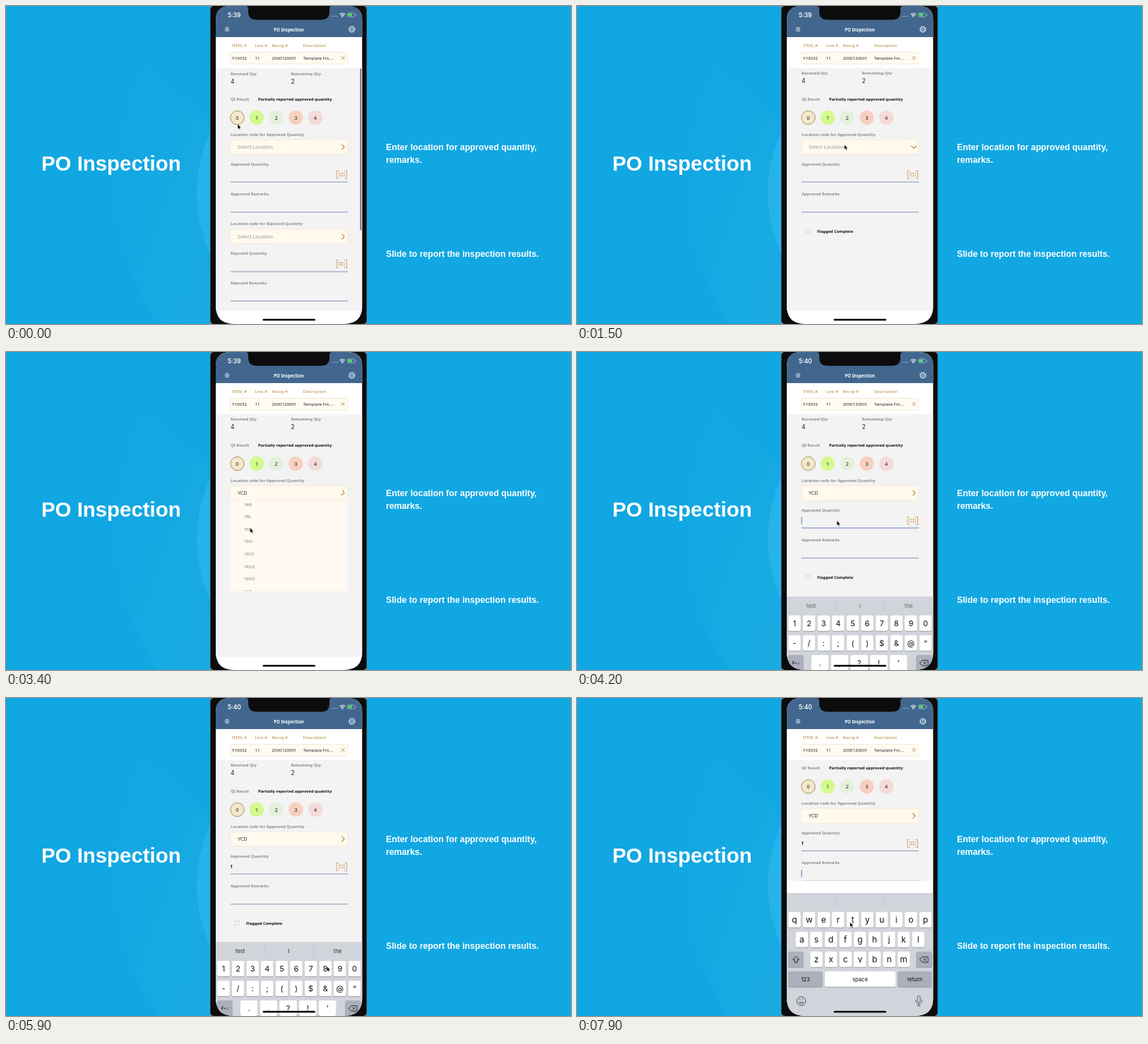
Recreate the animation shown at these times as an HTML page. Size 800 by 450 pixels, loop 8 s.

```html
<!DOCTYPE html>
<html lang="en">
<head>
<meta charset="utf-8">
<title>PO Inspection</title>
<style>
  html, body { margin: 0; width: 100%; height: 100%; overflow: hidden; background: #10a7e2; }
  svg { display: block; width: 100vw; height: 100vh; }
  text { font-family: "Noto Sans", "Open Sans", sans-serif; white-space: pre; }
  .big { font-family: "Liberation Sans", Arial, sans-serif; font-weight: 700; }
  .ui { font-family: Inter, Roboto, sans-serif; }
</style>
</head>
<body>
<svg id="stage" viewBox="0 0 800 450"></svg>
<script>
const LOOP = 8000;
const GOLD = '#b58a3c', CREAM = '#fff9ee', LABEL = '#8b8b8b', INK = '#222';

// ---- markup helpers ----
const text = (x, cy, s, size, fill, extra = '') =>
  `<text x="${x}" y="${(cy + size * 0.36).toFixed(2)}" font-size="${size}" fill="${fill}" ${extra}>${s}</text>`;
const rect = (x, y, w, h, fill, extra = '') =>
  `<rect x="${x}" y="${y}" width="${w}" height="${h}" fill="${fill}" ${extra}/>`;
const stroke = (d, color, width = 1, extra = '') =>
  `<path d="${d}" fill="none" stroke="${color}" stroke-width="${width}" ${extra}/>`;
const group = (id, body, extra = '') => `<g id="${id}" ${extra}>${body}</g>`;
const MID = 'text-anchor="middle"', SEMI = 'font-weight="600"', BOLD = 'font-weight="700"';

const label = (x, cy, s) => text(x, cy, s, 5.7, LABEL, SEMI);
const underline = (y, id = '') => `<path ${id && `id="${id}"`} d="M318 ${y}H484" stroke="#8294b9" stroke-width="1"/>`;
const chevron = (cy, id = '') =>
  `<path ${id && `id="${id}"`} d="M475.4 ${cy - 3.8}L479 ${cy}L475.4 ${cy + 3.8}" fill="none" stroke="${GOLD}" stroke-width="1.1"/>`;
const selectBox = y => rect(317.5, y, 166, 20.5, CREAM, 'rx="1.5" stroke="#f5ead6" stroke-width=".8"');
const scanIcon = cy =>
  stroke(`M471 ${cy - 5.5}H468V${cy + 5.5}H471M479.500 ${cy - 5.5}H482.500V${cy + 5.5}H479.500`, '#d2a06a', 1) +
  stroke(`M471.500 ${cy - 3}V${cy + 3.500}M474 ${cy - 3}V${cy + 3.500}M476.500 ${cy - 3}V${cy + 3.500}M479 ${cy - 3}V${cy + 3.500}`, '#cf9a66', 1, 'stroke-dasharray="2.4 1"');

// ---- page content ----
const chips = [['#f4e8cb', 327.5], ['#d2fa8c', 355], ['#e4f0dc', 382.7], ['#f8d0bf', 410.3], ['#f4dad8', 438]]
  .map(([fill, x], i) =>
    `<circle cx="${x}" cy="158" r="${i ? 10.2 : 9.7}" fill="${fill}" ${i ? '' : 'stroke="#a8905f" stroke-width="1"'}/>` +
    text(x, 158, i, 7.6, INK, MID)).join('');

const form =
  group('summary',
    label(318, 94.7, 'Received Qty') + label(403.500, 94.7, 'Remaining Qty') +
    text(318, 106, '4', 8.6, INK, 'class="ui"') + text(403.500, 106, '2', 8.6, INK, 'class="ui"')) +
  label(318, 132, 'QI Result') +
  text(357, 132, 'Partially reported approved quantity', 5.7, '#111', SEMI) + chips +
  label(318, 181.500, 'Location code for Approved Quantity') + selectBox(189.300) + chevron(199.500, 'chev') +
  group('location', '') +
  label(318, 223.500, 'Approved Quantity') + underline(249, 'qtyLine') + scanIcon(238.700) +
  group('qty', text(317.6, 238.800, '1', 6.2, '#111', SEMI)) +
  label(318, 266, 'Approved Remarks') + underline(291.700, 'remLine') +
  group('flagged',
    rect(324.500, 315.800, 5.4, 5.4, '#f6f6f6', 'stroke="#ccc" stroke-width=".7"') +
    text(340, 318.800, 'Flagged Complete', 5.7, '#111', SEMI)) +
  group('rejected',
    label(318, 308, 'Location code for Rejected Quantity') + selectBox(316) + chevron(326.200) +
    text(328, 326.200, 'Select Location', 7.1, '#999') +
    label(318, 350, 'Rejected Quantity') + scanIcon(365) + underline(376) +
    label(318, 392, 'Rejected Remarks') + underline(417.500)) +
  rect(317.6, 233.500, 1, 10, '#3f74c4', 'id="caret"');

const codes = 'YAA YAB YBL YCD YDO YDO1 YDO2 YDO3 YGR YIN001 YIN002 YPP YPF001 YPM0101 YPM0102 YPR010 YPR020'.split(' ');
const list = `<g id="list" clip-path="url(#listClip)">` + rect(317.500, 210, 166.500, 199.500, '#fff9f1') +
  group('items', codes.map((c, i) => text(337.500, 218 + i * 17.6, c, 5.6, '#777')).join('')) +
  '</g>';

// ---- keyboard ----
const GREY_KEY = '#abb0bb';
const key = (cx, cy, w, s, size, fill = '#fff') =>
  rect(cx - w / 2, cy - 10.4, w, 22, '#888c94', 'rx="2.6"') +
  rect(cx - w / 2, cy - 11.2, w, 22, fill, 'rx="2.6"') +
  text(cx, cy, s, size, '#111', MID + ' class="ui"');
const row = (chars, x0, cy, size, step = 20.6, w = 17.6) =>
  [...chars].map((c, i) => key(x0 + i * step, cy, w, c === '&' ? '&amp;' : c, size)).join('');

const numbers = row('1234567890', 308, 314, 11) + row('-/:;()$&@“', 308, 342, 11) +
  row('.,?!’', 344, 370, 11, 27.8, 25) + key(310, 370, 22, '#+=', 5.6, GREY_KEY) + key(323.5, 398, 49, 'ABC', 7.8, GREY_KEY);
const letters = row('qwertyuiop', 308, 314, 12) + row('asdfghjkl', 318.3, 342, 12) + row('zxcvbnm', 339, 370, 12) +
  key(310, 370, 22, '', 8, GREY_KEY) +
  stroke('M310 365.500L305.500 370.200H308V374.300H312V370.200H314.500Z', '#222', .9) +
  key(323.500, 398, 49, '123', 7.8, GREY_KEY) +
  `<circle cx="317.500" cy="429" r="6.3" fill="none" stroke="#50555c" stroke-width="1"/>` +
  stroke('M314 430.500Q317.500 435.500 321 430.500Z', '#50555c', .9) +
  stroke('M315.500 425.800V427.800M319.500 425.800V427.800', '#50555c', 1.1);

const keyboard = rect(297, 276, 207.500, 400, '#d1d4da') +
  stroke('M366 281V297M435.500 281V297', '#bfc3ca', .7) +
  group('hints', [[331.500, 'test'], [400.500, 'I'], [469.500, 'the']]
    .map(([x, s]) => text(x, 289, s, 7.8, '#333', MID + ' class="ui"')).join('')) +
  group('numbers', numbers) + group('letters', letters) +
  key(491.300, 370, 22.500, '', 8, GREY_KEY) +
  stroke('M489 366.300H497V374H489L485.300 370.150ZM490.500 368.300L494.300 372M494.300 368.300L490.500 372', '#222', .9) +
  key(401, 398, 100, 'space', 7.6) + key(478.200, 398, 48, 'return', 7.6, GREY_KEY) +
  rect(482, 421.500, 4, 9, 'none', 'rx="2" stroke="#50555c" stroke-width=".9"') +
  stroke('M479.500 427Q479.500 432.800 484 432.800Q488.500 432.800 488.500 427M484 432.800V435.800M481.500 435.800H486.500', '#50555c', .9);

// ---- phone chrome ----
const gear = `<circle cx="489.700" cy="33" r="4" fill="none" stroke="#e6edf5" stroke-width="1.2" stroke-dasharray="2 1.140"/>` +
  `<circle cx="489.700" cy="33" r="3.500" fill="none" stroke="#e6edf5" stroke-width=".8"/><circle cx="489.700" cy="33" r="1.500" fill="none" stroke="#e6edf5" stroke-width=".8"/>`;
const header = rect(297, 0, 207.500, 44, '#42678f') +
  group('clock', '') + text(400.500, 33.500, 'PO Inspection', 6.1, '#fff', MID + ' ' + SEMI) +
  stroke('M310.500 30.800H315.500M309.700 33H316.300M310.500 35.200H315.500', '#fff', .9) + gear +
  stroke('M461 14.500H470', '#a9bccf', 1, 'stroke-dasharray="1.300 1.100"') +
  stroke('M472.500 11.800Q476.300 8.700 480.100 11.800M474 13.500Q476.300 11.700 478.600 13.500', '#fff', 1.2) +
  `<circle cx="476.300" cy="15.200" r=".9" fill="#fff"/>` +
  rect(483.500, 9.800, 10.500, 5.600, 'none', 'rx="1.500" stroke="#a9bccf" stroke-width=".7"') +
  rect(484.300, 10.600, 5.800, 4, '#55d964', 'rx=".8"') + rect(494.800, 11.600, .8, 2, '#a9bccf');

const table =
  [[320, 'ITEM_#'], [352.500, 'Line #'], [376.500, 'Recvg #'], [420.700, 'Description']]
    .map(([x, s]) => text(x, 55.500, s, 6.1, GOLD)).join('') +
  rect(317.500, 65.500, 166, 16.500, '#fffbf3', 'stroke="#f4e5c8" stroke-width=".8" rx="1"') +
  [[320, 'Y10032'], [352.500, '11'], [376.500, '2000120001'], [420.700, 'Template Fin....']]
    .map(([x, s]) => text(x, 74, s, 6.1, INK)).join('') +
  stroke('M474.500 71L479.500 76M479.500 71L474.500 76', GOLD, .9);

const screenPath = 'M297 20Q297 0 318 0H483Q504.500 0 504.500 20V424Q504.500 450 478 450H323Q297 450 297 424Z';

document.getElementById('stage').innerHTML = `
<defs>
  <clipPath id="screenClip"><path d="${screenPath}"/></clipPath>
  <clipPath id="viewClip"><rect id="view" x="297" y="87.500" width="207.500" height="344"/></clipPath>
  <clipPath id="listClip"><rect id="listBox" x="317" y="210" width="168" height="199.500"/></clipPath>
  <linearGradient id="fan" x1="0" y1="0" x2="1" y2="1">
    <stop offset="0" stop-color="#fff" stop-opacity="0"/><stop offset="1" stop-color="#fff" stop-opacity=".045"/>
  </linearGradient>
</defs>
${rect(0, 0, 800, 450, '#10a7e2')}
<path d="M195 80Q150 160 155 265Q160 370 215 450H289V165Z" fill="url(#fan)"/>
<path d="M289 178Q251 264 289 351Z" fill="#26b3ec"/>
${rect(289, 0, 222, 450, '#8c8378')}
${rect(289, 0, 222, 450, '#3b3b3d', 'rx="5"')}
${rect(290, 0, 220, 450, '#0c0c0d', 'rx="5"')}
<g clip-path="url(#screenClip)">
  ${rect(297, 0, 207.5, 450, '#fff')}
  ${header}${table}
  <g clip-path="url(#viewClip)">
    ${rect(297, 87.5, 207.5, 400, '#f3f3f3')}
    ${group('form', form)}
    ${list}
  </g>
  ${rect(501.3, 88.5, 1.9, 229, '#747474', 'rx="1" id="bar"')}
  ${group('keyboard', keyboard)}
  ${rect(363.500, 442.700, 74.500, 2.600, '#000', 'rx="1.300"')}
</g>
<path d="M339 0Q343 0 343 4V8Q343 19.500 355 19.500H446Q458 19.500 458 8V4Q458 0 462 0Z" fill="#0c0c0d"/>
${text(50, 222.7, 'PO Inspection', 29.4, '#fff', 'class="big"')}
${text(538, 199.700, 'Enter location for approved quantity,', 12.25, '#fff', 'class="big"')}
${text(538, 218, 'remarks.', 12.25, '#fff', 'class="big"')}
${text(538, 350.300, 'Slide to report the inspection results.', 12.25, '#fff', 'class="big"')}
<path id="pointer" d="M0 0V7.200L1.700 5.700L2.800 8.200L4 7.700L2.900 5.300H5.100Z" fill="#000" stroke="#fff" stroke-width=".5"/>`;

// ---- motion ----
const $ = id => document.getElementById(id);
const set = (id, name, value) => $(id).setAttribute(name, value);
const show = (id, on) => set(id, 'opacity', +on);
const clamp = v => Math.min(1, Math.max(0, v));
const ramp = (t, from, to) => clamp((t - from) / (to - from));
const smooth = p => p * p * (3 - 2 * p);
const easeOut = p => 1 - (1 - p) ** 3;

const pointerPath = [
  [400, 328, 167], [1200, 378.500, 196], [1850, 378.500, 196], [2050, 364, 325], [3000, 364, 325],
  [3200, 345, 249], [3350, 345, 249], [3900, 368, 238.500], [4300, 368, 238.500], [4800, 309, 315],
  [4900, 309, 315], [5100, 345, 329], [5450, 476, 397], [5700, 476, 397], [6500, 337.700, 287],
  [7100, 337.700, 287], [7750, 386.500, 317]];

function along(path, t) {
  const i = path.findIndex(p => p[0] > t);
  if (i < 0) return path[path.length - 1].slice(1);
  if (!i) return path[0].slice(1);
  const a = path[i - 1], b = path[i], k = smooth(ramp(t, a[0], b[0]));
  return [a[1] + (b[1] - a[1]) * k, a[2] + (b[2] - a[2]) * k];
}

function render(t) {
  const early = t < 500, chosen = t >= 3300;
  const [px, py] = along(pointerPath, t);
  set('pointer', 'transform', `translate(${px} ${py})`);

  $('clock').innerHTML = text(314, 12.800, t < 4000 ? '5:39' : '5:40', 8.300, '#fff', SEMI + ' class="ui"');
  set('summary', 'transform', `translate(0 ${early ? .9 : 0})`);
  show('rejected', early);
  show('flagged', !early);
  set('bar', 'opacity', 1 - ramp(t, 400, 700));

  // Location drop-down
  const turn = smooth(ramp(t, 1250, 1400)) - smooth(ramp(t, 3300, 3450));
  set('chev', 'transform', `rotate(${90 * turn} 477 199.500)`);
  $('location').innerHTML = text(328, 199.500, chosen ? 'YCD' : 'Select Location', 7.1, chosen ? '#333' : '#999');
  const open = smooth(ramp(t, 1550, 1800)) - smooth(ramp(t, 3300, 3550));
  set('listBox', 'height', 199.500 * open);
  const scroll = 73.400 * smooth(ramp(t, 2200, 2600)) - 53.400 * smooth(ramp(t, 2650, 3000));
  set('items', 'transform', `translate(0 ${-scroll})`);

  // Keyboard and the shortened page above it
  const up = easeOut(ramp(t, 4070, 4570)) - smooth(ramp(t, 5750, 6100)) + easeOut(ramp(t, 6857, 7357));
  set('keyboard', 'transform', `translate(0 ${174 * (1 - up)})`);
  const second = t > 6500;
  show('numbers', !second);
  show('letters', second);
  set('hints', 'opacity', second ? 0 : ramp(t, 4100, 4250));
  const short = (t > 4570 && t < 5750) || t > 7357;
  set('view', 'height', short ? 171 : 344);
  const lift = 32.700 * smooth(ramp(t, 7357, 7650));
  set('form', 'transform', `translate(0 ${-lift})`);

  // Field focus
  const typed = t >= 4900;
  const inQty = t >= 4050 && t < 5750, inRemarks = t >= 6650;
  show('qty', typed);
  show('caret', inQty || inRemarks);
  set('caret', 'x', inQty && typed ? 320.600 : 317.600);
  set('caret', 'y', inRemarks ? 276 : 233.500);
  set('qtyLine', 'stroke', inQty ? '#5e82ba' : '#8294b9');
  set('remLine', 'stroke', inRemarks ? '#5e82ba' : '#8294b9');
}

const start = performance.now();
function tick() {
  render((performance.now() - start) % LOOP);
  requestAnimationFrame(tick);
}
tick();
</script>
</body>
</html>
```
